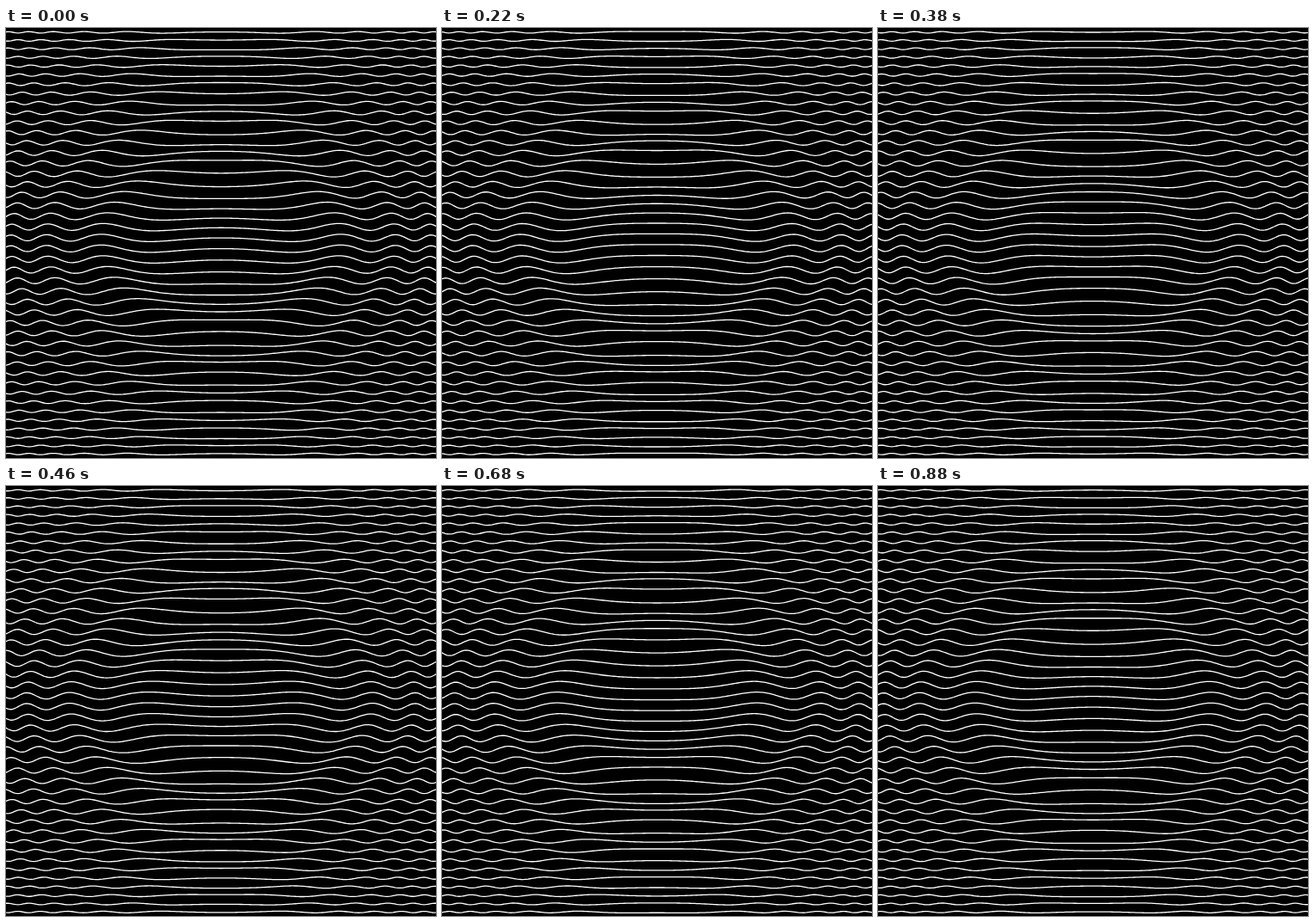
Recreate the animation shown at these times as an HTML page. Size 500 px wide and 500 px high, loop 0.9 s.

```html
<!DOCTYPE html>
<html lang="en">
<head>
<meta charset="utf-8">
<title>Rippling lines</title>
<style>
html, body { margin: 0; width: 100%; height: 100%; overflow: hidden; background: #000; }
svg { display: block; width: 100vw; height: 100vh; }
path { fill: none; stroke: #fff; stroke-width: 1.3; }
</style>
</head>
<body>
<svg viewBox="0 0 500 500"><path id="lines"/></svg>
<script>
const LOOP = 900, STEP = 20, ROWS = 44, MID = 250;
const path = document.getElementById('lines');

// Rows sit closer together towards the top and bottom.
const rowOffset = i => 364.6 * Math.sin((i - (ROWS - 1) / 2) * 0.0343);

// Rings tighten outwards, more so on the outer rows.
const phase = (dx, dy) => {
  const x2 = dx * dx, y2 = dy * dy;
  return 5.15e-4 * y2 + x2 * (2.17e-4 + 1.2e-9 * x2 + 3.4e-9 * y2);
};

const height = (dx, dy) => 4.6 * Math.exp(-(dy * dy + 0.22 * dx * dx) / 40000);

function draw(ms) {
  const turn = 2 * Math.PI * ms / LOOP;
  let d = '';
  for (let i = 0; i < ROWS; i++) {
    const dy = rowOffset(i);
    for (let x = -2; x <= 502; x += 2) {
      const dx = x - MID;
      const y = MID + 0.2 + dy + height(dx, dy) * Math.sin(phase(dx, dy) - turn);
      d += (x < 0 ? 'M' : 'L') + x + ' ' + y.toFixed(2);
    }
  }
  path.setAttribute('d', d);
}

const start = performance.now();
function tick() {
  const ms = (performance.now() - start) % LOOP;
  draw(Math.floor(ms / STEP) * STEP);
  requestAnimationFrame(tick);
}
tick();
</script>
</body>
</html>
```
